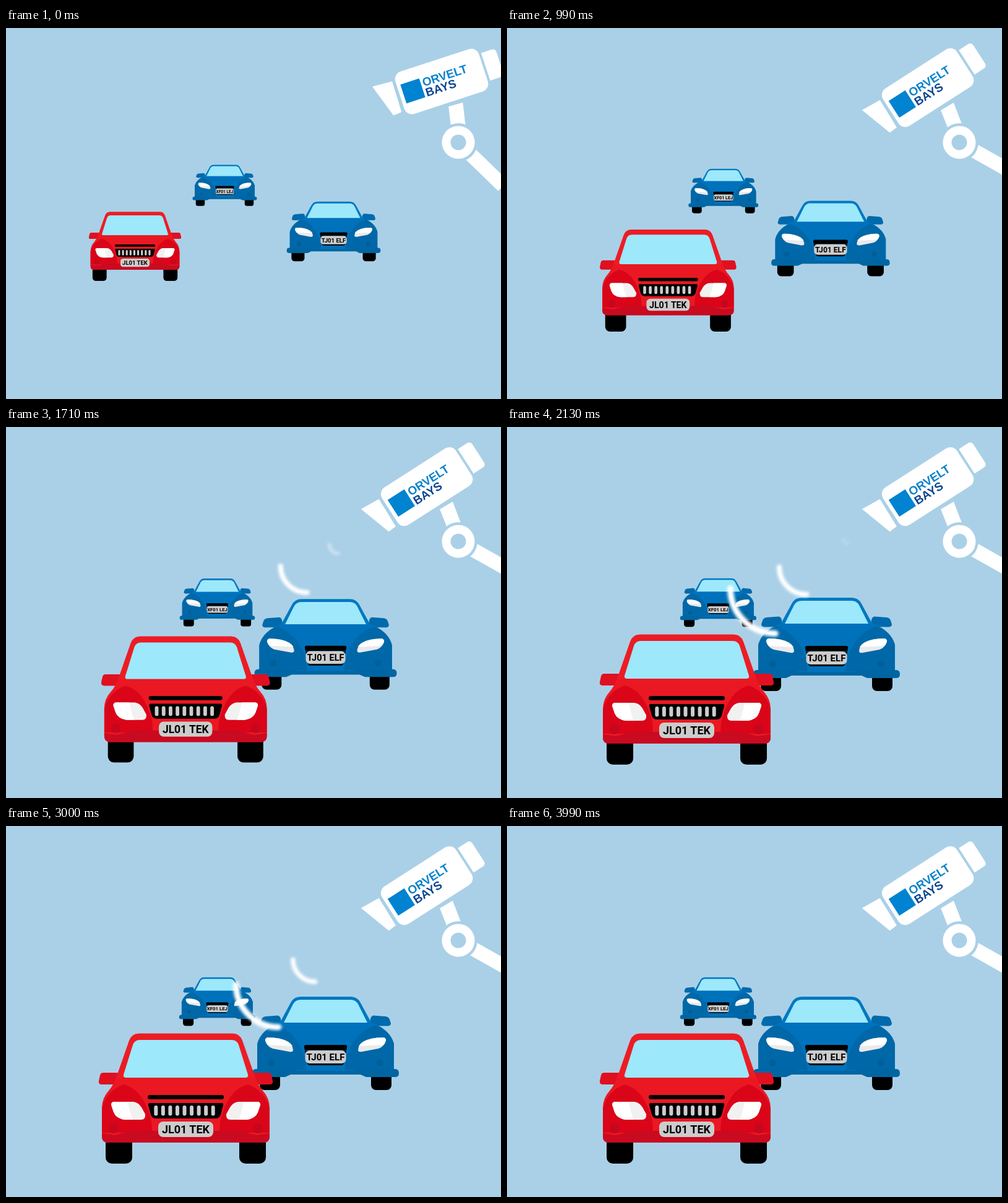
An HTML page that plays this animation: 800 px wide and 600 px high, repeating every 4.02 s.

```html
<!DOCTYPE html>
<html lang="en">
<head>
<meta charset="utf-8">
<title>Car park camera</title>
<style>
html, body { margin: 0; width: 100%; height: 100%; overflow: hidden; background: #aad0e7; }
svg { display: block; width: 800px; height: 600px; }
.plate { font: 700 18px Roboto, sans-serif; text-anchor: middle; fill: #000; }
.small { font-size: 15px; }
.brand { font: 700 19px "Liberation Sans", Arial, sans-serif; }
</style>
</head>
<body>
<svg viewBox="0 0 800 600">
  <defs>
    <filter id="glow" x="-100%" y="-100%" width="300%" height="300%">
      <feGaussianBlur stdDeviation="2.3"/>
    </filter>

    <g id="redBack">
      <rect x="161" y="495" width="43" height="51" rx="10"/>
      <path d="M157 399H180Q186 400 185 418H155Q149 418 150 412L152 403Q153 399 157 399Z" fill="#e01020"/>
    </g>
    <g id="redFront">
      <path d="M155 456Q163 428 190 418Q222 425 235 478L236 496H155Z" fill="#da0519"/>
      <circle cx="174" cy="489" r="8" fill="#c6071d"/>
      <path d="M155 497L176 500L205 493H291V512H165Q155 512 155 502Z" fill="#c90a20"/>
      <path d="M175 446H206Q214 447 219 455L225 466Q226 475 218 475H192Q178 473 174 463L170 451Q170 446 175 446Z" fill="#f1f1f1"/>
      <path d="M175 446H197Q199 460 205 475H192Q178 473 174 463L170 451Q170 446 175 446Z" fill="#fff"/>
    </g>

    <g id="blueBack">
      <rect x="410" y="392" width="33" height="35" rx="8"/>
      <path d="M419 308L439 306.5Q443 307 444 312L445 320Q445 323 441 323L416 323.5Q411 323 411 319L413 313Q414 309 419 308Z" fill="#006aad"/>
    </g>
    <g id="blueFront">
      <path d="M406 354Q411 332 436 322Q470 334 483 374L486 395H406Z" fill="#0068a8"/>
      <circle cx="429" cy="383" r="5.5" fill="#005f96"/>
      <path d="M424 342Q444 342 456 349Q464 355 464 363Q463 366 458 365L431 360Q422 357 419 347Q419 342 424 342Z" fill="#e9eaec"/>
      <path d="M424 342Q444 342 456 349Q461 352 463 356L423 354Q420 351 419 347Q419 342 424 342Z" fill="#fff"/>
    </g>
    <g id="blueCar">
      <use href="#blueBack"/>
      <use href="#blueBack" transform="translate(1033) scale(-1 1)"/>
      <path d="M441 321L460 286Q465 276 476 276H557Q568 276 573 286L592 321Z" fill="#0078c1"/>
      <path d="M449 318L464 288Q468 281 476 281H557Q565 281 569 288L584 318Z" fill="#9de8fb"/>
      <path d="M441 318H592Q621 330 627 352V398H406V352Q412 330 441 318Z" fill="#0072bc"/>
      <use href="#blueFront"/>
      <use href="#blueFront" transform="translate(1033) scale(-1 1)"/>
      <path d="M404 393H460L470 396H563L573 393H629Q635 393 635 400Q635 406 629 406H582L573 402H460L451 406H404Q398 406 398 400Q398 393 404 393Z" fill="#0066a3"/>
      <path d="M485 354H548Q552 354 551 358L546 384Q545 387 541 387H492Q488 387 487 384L482 358Q481 354 485 354Z"/>
      <path d="M483 363H550" stroke="#005f96"/>
      <rect x="483.5" y="363" width="66" height="21" rx="7" fill="#ccc"/>
    </g>
  </defs>

  <g id="far">
    <use href="#blueCar"/>
    <text class="plate small" x="516.5" y="379">XF01 LEJ</text>
  </g>
  <g id="near">
    <use href="#blueCar"/>
    <text class="plate small" x="516.5" y="379">TJ01 ELF</text>
  </g>
  <g id="red">
    <use href="#redBack"/>
    <use href="#redBack" transform="translate(581) scale(-1 1)"/>
    <path d="M177 410L199 347Q203 335.5 215 335.5H366Q378 335.5 382 347L404 410Z" fill="#ed1c24"/>
    <path d="M190 402L205 354Q208 346 216 346H365Q373 346 376 354L391 402Q392 407 387 407H194Q189 407 190 402Z" fill="#9de8fb"/>
    <path d="M177 407H404Q407 419 415 428Q426 440 426 456V502Q426 512 416 512H165Q155 512 155 502V456Q155 440 166 428Q174 419 177 407Z" fill="#ea1822"/>
    <use href="#redFront"/>
    <use href="#redFront" transform="translate(581) scale(-1 1)"/>
    <rect x="229" y="435" width="123" height="7" rx="3.5"/>
    <path d="M232 448H349Q352 448 351 452L347 467Q345 473 338 473H243Q236 473 234 467L230 452Q229 448 232 448Z"/>
    <path d="M242.5 460.2H341" stroke="#ccc" stroke-width="16.5" stroke-dasharray="6 5.55" stroke-dashoffset="3" visibility="hidden"/>
    <g id="slots" fill="#ccc"></g>
    <rect x="246" y="478" width="89" height="25" rx="8" fill="#ccc"/>
    <text class="plate" x="290.5" y="497">JL01 TEK</text>
  </g>

  <g id="waves" fill="none" stroke="#fff" stroke-linecap="round"></g>

  <g id="camera" fill="#fff">
    <path d="M0 0L47.1 89.4" stroke="#fff" stroke-width="23"/>
    <path d="M3 -60L27 -59L19 -20H-5Z"/>
    <circle r="31" fill="#aad0e7"/>
    <circle r="19.5" fill="none" stroke="#fff" stroke-width="14"/>
    <path d="M-104 -129L-71 -127L-72 -75L-86 -74Z"/>
    <rect x="-66" y="-138" width="142" height="72" rx="13"/>
    <path d="M80 -126H97Q104 -126 104 -119V-86Q104 -79 97 -79H80Z"/>
    <rect x="-60" y="-118" width="32" height="32" fill="#0083d0"/>
    <text class="brand" x="-25" y="-103" fill="#0a82ca">ORVELT</text>
    <text class="brand" x="-25" y="-86" fill="#0c4590">BAYS</text>
  </g>
</svg>
<script>
const LOOP = 4020, DRIVE = 1830, PAN = 840;
const $ = id => document.getElementById(id);
const clamp = v => Math.max(0, Math.min(1, v));
const mix = (a, b, k) => a + (b - a) * k;
const smooth = u => u * u * (3 - 2 * u);

function add(parent, tag, attrs) {
  const el = document.createElementNS("http://www.w3.org/2000/svg", tag);
  set(el, attrs);
  $(parent).append(el);
  return el;
}
function set(el, attrs) {
  for (const key in attrs) el.setAttribute(key, attrs[key]);
}

// Symmetric cubic-bezier(.7, 0, .3, 1), solved by bisection.
function ease(u) {
  let lo = 0, hi = 1, s = .5;
  for (let i = 0; i < 22; i++) {
    s = (lo + hi) / 2;
    const x = 2.1 * s * (1 - s) ** 2 + .9 * s * s * (1 - s) + s ** 3;
    if (x < u) lo = s; else hi = s;
  }
  return smooth(s);
}

// origin: centre of the artwork; from/to: x, y, scale; lag delays the move; bend curves the growth.
const cars = [
  { id: "far", origin: [516.5, 351.5], from: [353.5, 254.5, .439], to: [341.4, 284, .52], lag: 1.35, bend: .3 },
  { id: "near", origin: [516.5, 351.5], from: [529.5, 329, .64], to: [516.5, 351.5, 1], lag: 1.12, bend: .3 },
  { id: "red", origin: [290.5, 440.5], from: [208.5, 353, .53], to: [290.5, 440.5, 1], lag: 1, bend: 0 }
];

for (let i = 0; i < 9; i++)
  add("slots", "rect", { x: 239.3 + i * 11.55, y: 452, width: 6, height: 16.5, rx: 3 });

const waves = [1192, 1593, 2117, 2584].map(start =>
  ({ start, el: add("waves", "path", { filter: "url(#glow)" }) }));

function draw(t) {
  const u = clamp(t / DRIVE);
  for (const { id, origin: [ox, oy], from, to, lag, bend } of cars) {
    const k = ease(u ** lag);
    const size = mix(from[2], to[2], mix(u, u * u, bend));
    const x = mix(from[0], to[0], k), y = mix(from[1], to[1], k);
    set($(id), { transform: `translate(${x} ${y}) scale(${size}) translate(${-ox} ${-oy})` });
  }

  const angle = -32.7 + 14.6 * (1 - smooth(clamp(t / PAN)));
  set($("camera"), { transform: `translate(731 185) rotate(${angle})` });

  // Each wave grows as it travels down and left from the lens.
  for (const { el, start } of waves) {
    const p = (t - start) * .197;
    const r = Math.max(1, 6 + p * .36);
    set(el, {
      d: `M0 ${-r}A${r} ${r} 0 0 0 ${r} 0`,
      transform: `translate(${546 - p} ${186 + p * .8})`,
      "stroke-width": 5 + r * .07,
      opacity: clamp((p + 12) / 95) * clamp((225 - p) / 38)
    });
  }
}

function tick() {
  draw(performance.now() % LOOP);
  requestAnimationFrame(tick);
}
tick();
</script>
</body>
</html>
```
